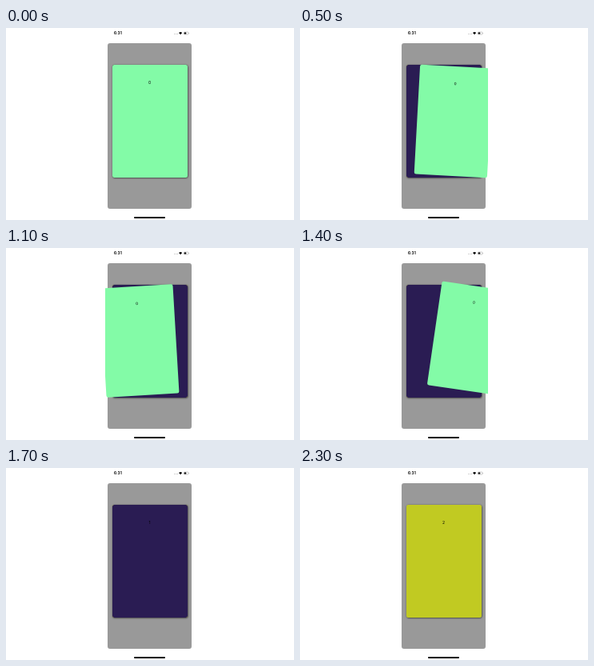
An HTML page that plays this animation: 360 px wide and 240 px high, repeating every 2400 ms.

```html
<!DOCTYPE html>
<html lang="en">
<head>
<meta charset="utf-8">
<title>Swipe cards</title>
<style>
  @property --x { syntax: "<number>"; inherits: false; initial-value: 0; }
  @property --y { syntax: "<number>"; inherits: false; initial-value: 0; }

  html, body { margin: 0; width: 100%; height: 100%; overflow: hidden; background: #fff; }
  .phone {
    position: absolute; left: 124px; top: 0; width: 111px; height: 240px;
    overflow: hidden; font-family: Inter, Roboto, sans-serif; color: #000;
  }
  .status { position: absolute; left: 0; top: 0; }
  .status text { font-size: 4.7px; font-weight: 700; }
  .panel {
    position: absolute; left: 3px; top: 19px; width: 105px; height: 207px;
    border-radius: 3px; background: #999;
  }
  .home {
    position: absolute; left: 36px; top: 236px; width: 39px; height: 1.5px;
    border-radius: 1px; background: #000;
  }
  .slot, .card {
    position: absolute; left: 8.5px; top: 45.5px; width: 94px; height: 141px;
    border-radius: 2.5px;
  }
  .slot { box-shadow: .4px .5px 2px rgba(0, 0, 0, .75); }

  /* The further a card is dragged, the more it tilts and shrinks. */
  .card {
    font-size: 5px; line-height: 6px; text-align: center;
    padding-top: 19px; box-sizing: border-box;
    transform:
      translate(calc(var(--x) * 1px), calc(var(--y) * 1px))
      rotate(clamp(-22.5deg, var(--x) * .262deg, 22.5deg))
      scale(max(.93, 1 - .0024 * max(var(--x), -1 * var(--x))));
  }
  .green { background: #83fba7; animation: green 2.4s step-end infinite; }
  .navy { background: #2a1c53; animation: navy 2.4s step-end infinite; }
  .yellow { background: #c1ca22; }

  @keyframes green {
    0%       { --x: 0; --y: 0; }
    4.1666%  { --x: 16; --y: 0; }
    8.3333%  { --x: 36; --y: -1; }
    20.8333% { --x: 12; --y: 0; }
    25%      { --x: 0; --y: 0; }
    33.3333% { --x: -38; --y: -2; }
    45.8333% { --x: -13; --y: -.5; }
    50%      { --x: 0; --y: 0; }
    58.3333% { --x: 31.5; --y: -4; }
    62.5%    { --x: 54; --y: -4; }
    66.6666% { --x: 82; --y: -5; }
    70.8333%, 100% { --x: 300; --y: -5; }
  }
  @keyframes navy {
    0%       { --x: 0; --y: 0; }
    83.3333% { --x: -38.3; --y: 2.2; }
    87.5%    { --x: -58; --y: 3; }
    91.6666% { --x: -84; --y: 4; }
    95.8333%, 100% { --x: -300; --y: 5; }
  }
</style>
</head>
<body>
<div class="phone">
  <svg class="status" width="111" height="14" viewBox="0 0 111 14">
    <text x="11" y="8.2">6:31</text>
    <g fill="#777">
      <circle cx="86.6" cy="7.6" r=".4"/>
      <circle cx="87.9" cy="7.6" r=".4"/>
      <circle cx="89.2" cy="7.6" r=".4"/>
      <circle cx="90.5" cy="7.6" r=".4"/>
    </g>
    <path d="M92 5.9Q94.1 4 96.2 5.9L94.1 8.3Z"/>
    <rect x="98.2" y="5" width="5.9" height="3.1" rx=".9" fill="none" stroke="#888" stroke-width=".4"/>
    <rect x="98.7" y="5.5" width="2.6" height="2.1" rx=".5"/>
    <rect x="104.5" y="6" width=".4" height="1.1" fill="#888"/>
  </svg>
  <div class="panel"></div>
  <div class="slot"></div>
  <div class="card yellow">2</div>
  <div class="card navy">1</div>
  <div class="card green">0</div>
  <div class="home"></div>
</div>
</body>
</html>
```
